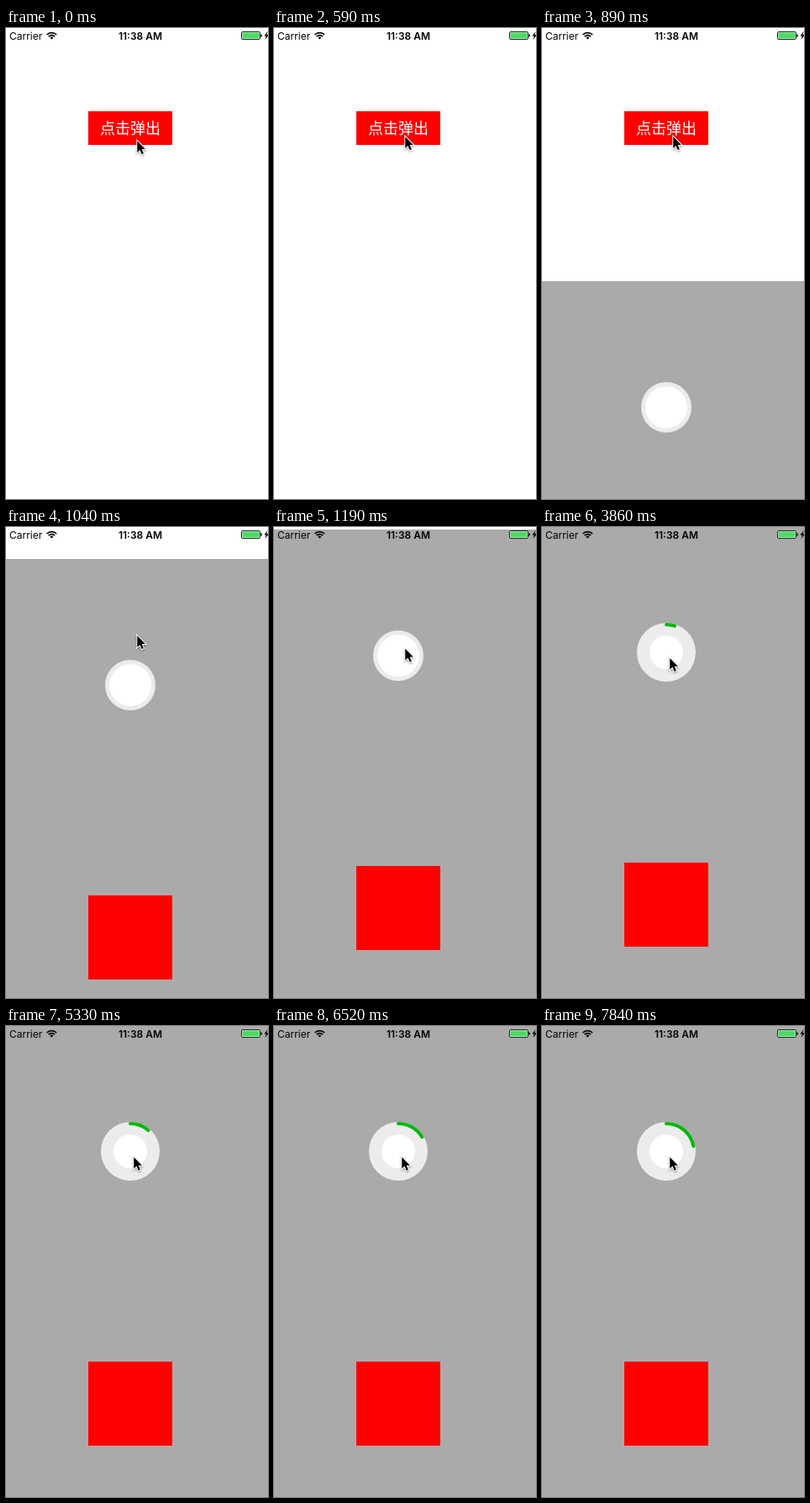
Recreate the animation shown at these times as an HTML page. Size 312 by 560 pixels, loop 7990 ms.

```html
<!DOCTYPE html>
<html lang="zh">
<head>
<meta charset="utf-8">
<style>
  html, body { margin: 0; height: 100%; overflow: hidden; background: #fff; }
  svg { display: block; width: 100%; height: 100%; }
  .status { font: 12px Inter, sans-serif; }
  .clock { font-weight: 600; text-anchor: middle; }
  .label { font: 300 18px "Noto Sans CJK SC", "Noto Sans CJK", sans-serif; fill: #fff; text-anchor: middle; }
  .cursor { stroke: #fff; stroke-width: 2; paint-order: stroke; filter: drop-shadow(0 1px 1px #0006); }
</style>
</head>
<body>
<svg viewBox="0 0 312 560">
  <rect width="312" height="560" fill="#fff"/>
  <rect x="98" y="99" width="100" height="40" fill="#f00"/>
  <text class="label" x="148" y="126">点击弹出</text>

  <g id="panel">
    <rect width="312" height="570" fill="#aaa"/>
    <rect x="98" y="400" width="100" height="100" fill="#f00"/>
    <circle id="ring" cx="148" cy="150" fill="#ececec"/>
    <circle id="knob" cx="148" cy="150" fill="#fff"/>
    <circle id="arc" cx="148" cy="150" r="33" pathLength="360" transform="rotate(-90 148 150)"
      fill="none" stroke="#00b90a" stroke-width="4" stroke-linecap="round"/>
  </g>

  <g class="status">
    <text x="4" y="13.5">Carrier</text>
    <text class="clock" x="160" y="13.5">11:38 AM</text>
    <g fill="none" stroke="#000" stroke-width="1.7">
      <path d="M48.6 8a8.2 8.2 0 0 1 11.6 0M50.7 10.2a5.2 5.2 0 0 1 7.4 0"/>
    </g>
    <path d="M52.4 11.4a2.8 2.8 0 0 1 4 0l-2 2z"/>
    <rect x="280.5" y="4.5" width="22" height="9" rx="1.5" fill="#fff" stroke="#222"/>
    <rect x="281.5" y="5.5" width="20" height="7" rx=".5" fill="#4cd964"/>
    <path d="M303.4 7.2q1.6.3 1.6 1.8t-1.6 1.8z"/>
    <path d="M311.5 4l-4 5.6h2.3l-1.3 4.4 4.5-5.8h-2.6z"/>
  </g>

  <path id="cursor" class="cursor" d="M1 1V14.6L4.2 11.6 6.4 16.8 8.6 15.9 6.4 10.8H10.6Z"/>
</svg>

<script>
const LOOP = 7990, PRESS = 2526, TICK = 147.5;
const byId = id => document.getElementById(id);
const [panel, ring, knob, arc, cursor] = ['panel', 'ring', 'knob', 'arc', 'cursor'].map(byId);

// Each entry holds from its start time: [ms, value...]
const panelTops = [[0, 600], [888, 301], [1037, 38], [1187, 3], [1337, -1]];
const cursorSpots = [
  [0, 155.3, 133.3], [438, 155.3, 131], [588, 155.3, 128.3], [1187, 155.3, 143.8],
  [1337, 155.3, 169], [1628, 153, 160], [1778, 151.3, 155]
];
const held = (keys, t) => keys.findLast(key => key[0] <= t).slice(1);

function draw(t) {
  const [top] = held(panelTops, t);
  const [x, y] = held(cursorSpots, t);
  const pressed = t >= PRESS;
  panel.setAttribute('transform', `translate(0 ${top})`);
  cursor.setAttribute('transform', `translate(${x} ${y})`);
  ring.setAttribute('r', pressed ? 35 : 30);
  knob.setAttribute('r', pressed ? 20 : 25);

  // Progress advances in ticks, at 15.4 degrees per second
  const elapsed = Math.floor((t - PRESS) / TICK) * TICK;
  const angle = Math.max(0.01, (elapsed - 154) * 0.0154);
  arc.setAttribute('stroke-dasharray', `${angle} 360`);
  arc.setAttribute('visibility', pressed ? 'visible' : 'hidden');
}

function loop() {
  draw(performance.now() % LOOP);
  requestAnimationFrame(loop);
}
loop();
</script>
</body>
</html>
```
